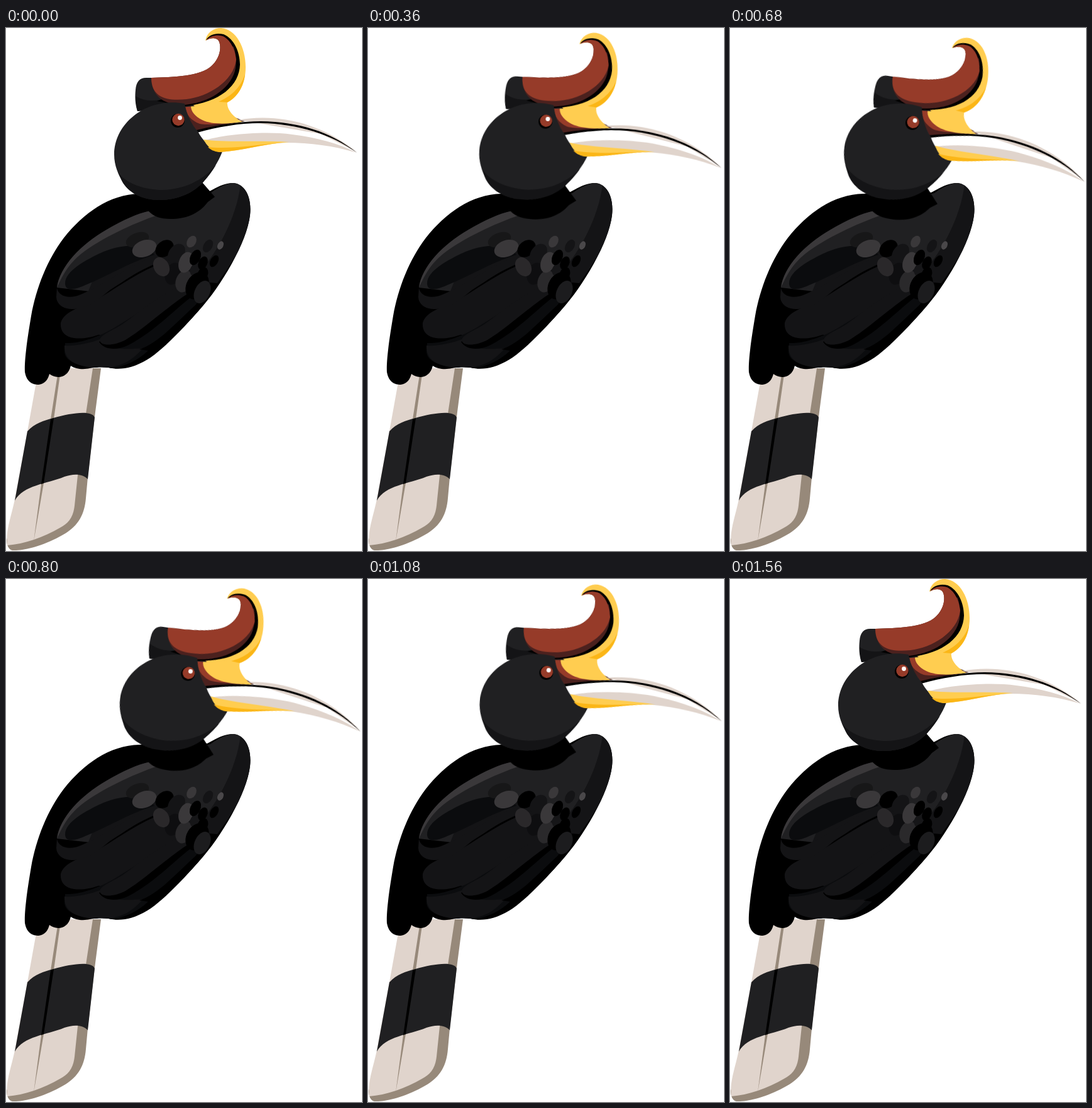
Animation of 566 by 830 pixels, one loop 1720 ms. Source, as an HTML page:

```html
<!DOCTYPE html>
<html lang="en">
<head>
<meta charset="utf-8">
<title>Hornbill</title>
<style>
  html, body { margin: 0; width: 100%; height: 100%; overflow: hidden; background: #fff; }
  svg { display: block; width: 566px; height: 830px; }
  #head { transform-origin: 257px 260px; }
  .coal { fill: #202022; }
  .soot { fill: #141416; }
  .ink { fill: #0b0c0e; }
  .ash { fill: #3a383a; }
  .bone { fill: #e0d4cc; }
  .taupe { fill: #97897a; }
  .rust { fill: #963b29; }
  .wine { fill: #4b211e; }
  .sun { fill: #ffcd50; }
  .amber { fill: #fbb616; }
</style>
</head>
<body>
<svg viewBox="0 0 566 830">
  <defs>
    <path id="trunk" d="M212 263C164 264 123 294 92 333C66 367 48 412 40 457C33 498 29 530 30 546C33 562 42 566 52 566C62 565 67 557 69 549C79 557 98 557 103 536C111 542 125 542 133 540C145 538 155 538 163 539C180 543 200 541 225 526C250 511 287 470 307 448C342 410 383 340 388 297C391 268 380 248 362 246C346 245 330 256 320 261Z"/>
    <clipPath id="inside"><use href="#trunk"/></clipPath>
  </defs>

  <g id="tail">
    <path class="taupe" d="M100 540H151L141 617L130 713L127 746C124 784 104 798 80 810C52 824 24 830 10 829C4 828 1 820 1 812Z"/>
    <path class="bone" d="M52 540H138L127 612L114 710L109 758C107 777 99 786 86 793C60 808 29 819 2 821C-1 798 8 777 14 748L34 640Z"/>
    <path class="taupe" d="M82 550H86L76 620L60 722L44 815L56 724L71 621Z"/>
    <path class="coal" d="M34 640C46 627 60 623 75 619C104 611 136 606 141 618L130 716C122 707 107 707 93 712C64 724 28 725 14 750Z"/>
    <path d="M71 621L76 619L60 722L56 724Z"/>
  </g>

  <use href="#trunk"/>
  <g id="wing" clip-path="url(#inside)">
    <path class="soot" d="M373 246L394 250V300C384 335 360 372 336 405L285 400L330 330Z"/>
    <path class="coal" d="M226 291L325 262C340 251 357 243 373 246C369 288 347 337 320 372L270 405L150 420L81 412C86 378 122 342 165 317C190 303 210 294 226 291Z"/>
    <path class="soot" d="M140 395L235 352L300 372L324 405C304 440 245 500 190 505L110 470Z"/>
    <path d="M100 440C150 425 200 389 245 371L300 400L222 434C185 466 145 493 112 498C93 501 86 490 86 477Z"/>
    <path class="soot" d="M87 468C92 450 117 444 142 432C171 416 201 393 238 377L290 404C238 434 195 470 153 485C112 500 85 492 87 468Z"/>
    <path class="soot" d="M81 412C83 426 100 430 116 424C155 409 190 379 236 362L234 374C210 386 190 400 165 416C145 433 130 444 109 446C92 447 80 439 80 426Z"/>
    <path class="ink" d="M94 405C94 386 126 368 155 355C178 346 200 343 224 347L236 360C198 371 157 396 126 408C108 416 94 418 94 405Z"/>
    <path class="ink" d="M94 500C120 501 150 489 175 474L275 412L320 412C300 445 268 484 232 514C205 537 180 541 155 540C126 538 92 533 93 512Z"/>
    <path class="soot" d="M93 504C112 505 134 500 149 494C160 512 195 510 218 508C196 533 176 540 145 539C115 538 92 530 93 504Z"/>
    <path d="M148 498C155 510 175 513 195 503C235 482 268 447 298 424L278 412C235 440 190 476 148 498Z"/>
    <path class="soot" d="M149 495C152 485 171 480 188 468C218 446 246 423 277 410L290 421C257 442 220 477 190 495C171 505 149 505 149 495Z"/>
    <path d="M212 510C247 499 285 451 313 430L324 426C295 465 258 505 222 526C205 537 185 541 170 540C190 537 212 526 226 512Z"/>
    <path class="ash" d="M81 412C85 379 119 343 160 320C188 304 207 295 230 290L241 297C202 310 151 334 120 358C99 375 91 391 81 412Z"/>
    <g id="scales"></g>
  </g>

  <g id="head">
    <path d="M312 245L332 268L321 276C306 296 285 303 262 303C244 303 235 299 227 291L230 260Z"/>

    <path class="wine" d="M284 125L300 118L380 148C350 153 325 158 303 163C294 151 286 139 284 125Z"/>
    <path class="rust" d="M285 125L296 118L345 151C331 153 317 154 308 152C294 147 286 137 285 125Z"/>
    <path class="sun" d="M294 124L340 105L352 117C350 130 364 143 376 149C353 152 329 154 312 146C300 140 294 132 294 124Z"/>

    <path class="coal" d="M209 132C205 120 205 108 206 98C207 86 212 79 223 79H240L300 124Z"/>
    <path class="soot" d="M206 108C218 116 233 116 246 114L290 124L209 132C207 124 206 116 206 108Z"/>
    <path class="sun" d="M317 20C319 7 330 0 342 0C366 2 381 31 381 62C381 93 366 111 352 118L318 119L330 100L346 35L338 20C334 14 324 16 317 20Z"/>
    <path class="amber" d="M380 73C373 96 356 109 338 117L352 118C367 110 378 94 380 73Z"/>
    <path d="M318 19C323 10 335 7 346 10C363 17 372 39 372 58C371 91 341 118 285 124L240 116L330 80L346 30L338 20C334 14 324 16 318 19Z"/>
    <path class="wine" d="M231 79C265 78 309 77 327 60C341 47 343 29 338 20L362 30C367 45 367 62 362 74C349 104 315 119 284 122C255 122 232 113 231 79Z"/>
    <path class="rust" d="M231 79C265 78 309 77 327 60C341 47 343 29 338 20C333 14 324 16 318 20C325 11 339 10 347 14C358 21 364 34 366 50C362 85 321 109 287 113C258 116 231 112 231 79Z"/>

    <path class="bone" d="M368 146C425 136 495 146 558 197L500 168L400 151Z"/>
    <path d="M303 162C340 153 375 148 405 148C465 149 516 164 558 198C518 169 465 152 405 151C370 151 337 157 304 166Z"/>
    <path class="bone" d="M314 179C345 169 410 163 455 169C495 174 528 183 558 198C520 187 485 182 445 182L340 190Z"/>
    <path class="coal" d="M284 120C225 109 172 150 172 201C172 219 179 232 184 242C194 262 218 273 243 273C276 273 300 260 314 244C327 229 338 212 344 196C325 192 312 178 305 164C295 153 287 137 284 120Z"/>
    <path class="soot" d="M178 229C192 248 222 257 249 257C284 256 313 242 334 217C328 227 322 235 314 244C300 260 276 273 243 273C218 273 194 262 184 242Z"/>
    <path class="sun" d="M314 177C345 182 400 178 450 181C414 183 376 195 340 197C326 195 319 186 314 177Z"/>
    <path class="amber" d="M321 189C355 193 400 185 440 182C410 184 374 195 340 197C330 196 325 193 321 189Z"/>
    <circle cx="273" cy="147" r="11"/>
    <circle class="rust" cx="274" cy="145.500" r="9.700"/>
    <circle fill="#fff" cx="276.500" cy="142.500" r="3.400"/>
  </g>
</svg>
<script>
  // x, y, long radius, short radius, tilt, shade
  const scales = [
    [209, 336, 19, 11, -20, '#171718'],
    [220, 350, 20, 13, -20, '#3a383a'],
    [252, 350, 16, 12, -40, '#000'],
    [271, 358, 17, 12, -55, '#141416'],
    [295, 339, 10, 7, -60, '#3a383a'],
    [321, 346, 11, 7, -60, '#141416'],
    [341, 345, 7, 4.5, -65, '#4a484a'],
    [266, 390, 18, 13, -70, '#0e0e10'],
    [247, 379, 16, 12, 60, '#2a282a'],
    [283, 402, 18, 13, -70, '#2a292b'],
    [286, 372, 17, 11, -70, '#3a383a'],
    [302, 384, 11, 9, -60, '#161618'],
    [301, 364, 13, 8, -65, '#000'],
    [313, 373, 11, 7, -65, '#000'],
    [331, 370, 10, 6, -60, '#000'],
    [313, 390, 11, 8, -70, '#000'],
    [304, 409, 23, 17, -60, '#000'],
    [312, 419, 19, 12, -65, '#1c1c1e']
  ];
  document.getElementById('scales').innerHTML = scales.map(([x, y, a, b, tilt, shade]) =>
    `<ellipse rx="${a}" ry="${b}" fill="${shade}" transform="translate(${x} ${y}) rotate(${tilt})"/>`).join('');

  // Nod down, return, then a short rest, in 40 ms ticks
  const loop = 1720, low = 720, rest = 1560, tick = 40;
  document.getElementById('head').animate([
    { transform: 'rotate(0deg)', offset: 0, easing: `steps(${low / tick})` },
    { transform: 'rotate(9.25deg)', offset: low / loop, easing: `steps(${(rest - low) / tick})` },
    { transform: 'rotate(0deg)', offset: rest / loop },
    { transform: 'rotate(0deg)', offset: 1 }
  ], { duration: loop, iterations: Infinity });
</script>
</body>
</html>
```
